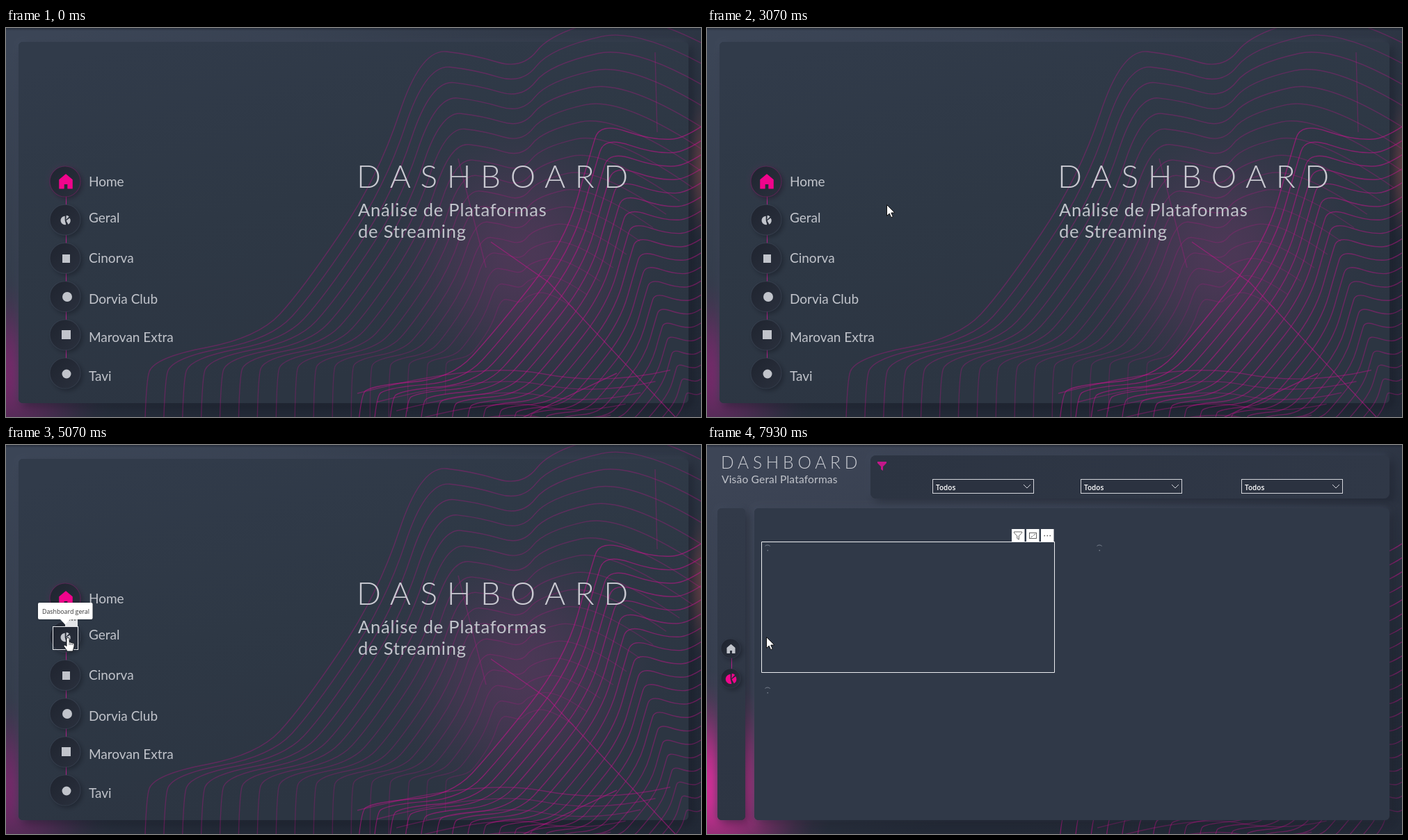
These frames come from a looping animation (999x560 px, 8 s). An HTML page with a canvas:

```html
<!DOCTYPE html>
<html lang="pt">
<head>
<meta charset="utf-8">
<title>Dashboard</title>
<style>
html, body { margin: 0; width: 100%; height: 100%; overflow: hidden; background: #2f3947; }
canvas { display: block; width: 999px; height: 560px; }
</style>
</head>
<body>
<canvas id="stage" width="999" height="560"></canvas>
<script>
const W = 999, H = 560, LOOP = 8000, TICK = 200 / 3;
const PINK = '#f0058c', GREY = '#c1c4cb', CLEAR = 'rgba(32,39,52,0)';
const SANS = 'Lato, "Open Sans", sans-serif';
const UI = '"Open Sans", "Noto Sans", sans-serif';
const stage = document.getElementById('stage').getContext('2d');

function layer(draw) {
  const c = document.createElement('canvas');
  c.width = W;
  c.height = H;
  draw(c.getContext('2d'));
  return c;
}

function text(g, str, x, y, font, color, spacing = 0) {
  g.font = font;
  g.letterSpacing = spacing + 'px';
  g.fillStyle = color;
  g.fillText(str, x, y);
}

function shape(g, pts, x = 0, y = 0, s = 1) {
  g.beginPath();
  pts.forEach(([a, b]) => g.lineTo(x + a * s, y + b * s));
  g.closePath();
}

function line(g, ...pts) {
  g.beginPath();
  pts.forEach(p => g.lineTo(...p));
  g.stroke();
}

function linear(g, x0, y0, x1, y1, ...colors) {
  const grad = g.createLinearGradient(x0, y0, x1, y1);
  colors.forEach((c, i) => grad.addColorStop(i / (colors.length - 1), c));
  return grad;
}

function glow(g, x, y, rx, ry, rgb, alpha) {
  g.save();
  g.translate(x, y);
  g.scale(rx, ry);
  const grad = g.createRadialGradient(0, 0, 0, 0, 0, 1);
  for (let r = 0; r <= 1; r += .125) {
    grad.addColorStop(r, `rgba(${rgb},${alpha * (1 + Math.cos(r * Math.PI)) / 2})`);
  }
  g.fillStyle = grad;
  g.fillRect(-1, -1, 2, 2);
  g.restore();
}

function panel(g, x, y, w, h, r, fill, dark = .4) {
  g.save();
  g.beginPath();
  g.roundRect(x, y, w, h, r);
  g.fillStyle = fill;
  g.shadowColor = 'rgba(70,80,100,.5)';
  g.shadowBlur = 8;
  g.shadowOffsetX = g.shadowOffsetY = -2;
  g.fill();
  g.shadowColor = `rgba(15,18,28,${dark})`;
  g.shadowBlur = 14;
  g.shadowOffsetX = g.shadowOffsetY = 5;
  g.fill();
  g.restore();
}

function backdrop(g, top, middle) {
  g.fillStyle = linear(g, 100, 0, 300, H, top, middle, '#222936');
  g.fillRect(0, 0, W, H);
  g.fillStyle = linear(g, 400, 0, W, 0, CLEAR, 'rgba(32,39,52,.35)');
  g.fillRect(0, 0, W, H);
}

function topEdge(g, rgb, alpha) {
  g.fillStyle = linear(g, 0, 0, 0, 4, `rgba(${rgb},${alpha})`, `rgba(${rgb},0)`);
  g.fillRect(0, 0, W, 4);
}

// ---- contour lines ----

function curve(g, pts) {
  g.beginPath();
  g.moveTo(...pts[0]);
  for (let i = 1; i < pts.length - 1; i++) {
    const [x, y] = pts[i], [nx, ny] = pts[i + 1];
    g.quadraticCurveTo(x, y, (x + nx) / 2, (y + ny) / 2);
  }
  g.stroke();
}

// each line is the ridge shrunk a step further towards one point
function contours(g, ridge, cx, cy, n, step, alpha) {
  g.lineWidth = 1.4;
  for (let k = 0; k < n; k++) {
    const s = 1 - k * step;
    g.strokeStyle = `rgba(203,18,143,${alpha * (.5 + s / 2)})`;
    curve(g, ridge.map(([x, y]) => [cx + (x - cx) * s, cy + (y - cy) * s]));
  }
}

const hill = [
  [198, 720], [198, 515], [214, 474], [362, 446], [425, 378], [535, 215],
  [596, 30], [670, 38], [742, 60], [785, 5], [940, -30], [1300, 220]
];
const slope = [
  [500, 720], [504, 530], [530, 514], [640, 505], [700, 440], [803, 310],
  [840, 180], [854, 136], [930, 162], [985, 158], [1100, 60]
];

function hills(g) {
  contours(g, hill, 740, 480, 17, .05, .33);
}

function slopes(g) {
  contours(g, slope, 1000, 590, 20, .045, .56);
  contours(g, [[505, 526], [680, 480], [860, 515], [1050, 470]], 760, 640, 5, .11, .4);
}

function rays(g) {
  g.strokeStyle = 'rgba(203,18,143,.5)';
  line(g, [697, 308], [780, 366], [962, 560]);
  line(g, [878, 497], [740, 562]);
  g.strokeStyle = 'rgba(203,18,143,.28)';
  line(g, [650, 188], [690, 345]);
  line(g, [933, 35], [936, 150]);
}

// ---- icons ----

function house(g, x, y, s, color) {
  g.fillStyle = g.strokeStyle = color;
  g.lineJoin = 'round';
  g.lineWidth = s * .16;
  shape(g, [[0, -.95], [.85, -.22], [.85, .92], [.3, .92], [.3, .3], [-.3, .3],
    [-.3, .92], [-.85, .92], [-.85, -.22]], x, y, s);
  g.fill();
  g.stroke();
}

function pie(g, x, y, r, color) {
  g.fillStyle = color;
  const slice = (dx, dy, a, b) => {
    g.beginPath();
    g.moveTo(x + dx, y + dy);
    g.arc(x + dx, y + dy, r, a * Math.PI, b * Math.PI);
    g.fill();
  };
  slice(-.8, 0, .42, 1.5);
  slice(.8, -1, 1.52, 1.75);
  slice(1, .2, -.2, .34);
}

function funnel(g, x, y, s) {
  shape(g, [[0, 0], [13, 0], [13, 2], [8, 7], [8, 13], [5, 11], [5, 7], [0, 2]], x, y, s);
}

function dot(g, x, y, r) {
  g.beginPath();
  g.arc(x, y, r, 0, 7);
  g.fill();
}

function disc(g, x, y, r, rim) {
  g.save();
  g.fillStyle = linear(g, x - r, y - r, x + r, y + r, '#1f242f', '#2a303d');
  g.shadowColor = 'rgba(14,17,26,.45)';
  g.shadowBlur = 7;
  g.shadowOffsetX = g.shadowOffsetY = 3;
  dot(g, x, y, r);
  g.restore();
  g.strokeStyle = rim;
  g.lineWidth = 1.2;
  g.stroke();
}

function link(g, x, y0, y1) {
  g.fillStyle = '#b3208a';
  g.fillRect(x, y0, 1, y1 - y0);
}

// ---- pages ----

const menu = [
  ['Home', 228], ['Geral', 280], ['Cinorva', 338],
  ['Dorvia Club', 397], ['Marovan Extra', 452], ['Tavi', 508]
];
const menuY = i => 221 + 55.2 * i;

const homePage = layer(g => {
  backdrop(g, '#3b4556', '#343d4c');
  glow(g, 0, 500, 160, 150, '150,38,125', .65);
  panel(g, 18, 20, 963, 520, 6, linear(g, 200, 20, 320, 540, '#313b4a', '#2e3845', '#2c3542'), .45);
  glow(g, 1005, 200, 32, 120, '150,75,75', .5);
  glow(g, 740, 330, 210, 220, '118,58,112', .42);
  hills(g);
  slopes(g);
  rays(g);

  link(g, 86, menuY(0), menuY(5));
  glow(g, 85, 221, 32, 32, '160,30,125', .3);
  menu.forEach(([name, base], i) => {
    disc(g, 85, menuY(i), 22, i ? 'rgba(70,80,98,.4)' : 'rgba(150,30,115,.4)');
    text(g, name, 119, base, '19px ' + SANS, GREY);
  });
  house(g, 86, 221, 10.5, PINK);
  pie(g, 85.5, 277, 6.2, GREY);
  g.fillStyle = GREY;
  g.fillRect(81, 326, 11, 12);
  dot(g, 88, 387, 7);
  g.fillRect(80, 435, 13, 13);
  dot(g, 87, 498, 6.5);

  text(g, 'DASHBOARD', 504, 230, '300 46px ' + SANS, '#cacad2', 13.6);
  text(g, 'Análise de Plataformas', 506, 271, '25.5px ' + SANS, GREY, .8);
  text(g, 'de Streaming', 506, 302, '25.5px ' + SANS, GREY, .8);
  topEdge(g, '20,25,36', .5);
});

const blankPage = layer(g => {
  g.fillStyle = '#fefefe';
  g.fillRect(0, 0, W, H);
  topEdge(g, '110,110,110', .4);
});

const overviewPage = layer(g => {
  backdrop(g, '#3d4556', '#353d4d');
  glow(g, 0, 495, 185, 170, '212,46,152', .95);
  slopes(g);
  panel(g, 235, 15, 746, 62, 8, linear(g, 235, 0, 981, 0, '#2c3442', '#303847'));
  panel(g, 15, 91, 40, 449, 6, linear(g, 0, 91, 0, 540, '#323a49', '#2d3543'));
  panel(g, 68, 91, 913, 449, 6, '#303948', .3);

  text(g, 'DASHBOARD', 20, 34, '300 24.5px ' + SANS, '#cdcfd5', 5.8);
  text(g, 'Visão Geral Plataformas', 21, 55, '15.5px ' + SANS, GREY, .2);
  g.fillStyle = '#c4178a';
  funnel(g, 245, 24, 1);
  g.fill();

  link(g, 35, 293, 336);
  disc(g, 34, 293, 14, 'rgba(70,80,98,.3)');
  disc(g, 34, 336, 14, 'rgba(70,80,98,.3)');
  house(g, 34.5, 293.5, 6.5, GREY);
  pie(g, 34.5, 337, 7, PINK);
  g.strokeStyle = '#eceef1';
  g.lineWidth = 1;
  g.strokeRect(78.5, 139.5, 421, 188);
  topEdge(g, '20,25,36', .5);
});

// ---- changing parts ----

function spinner(g, x, y, turn) {
  g.strokeStyle = g.fillStyle = 'rgba(175,182,195,.55)';
  g.lineWidth = 1;
  g.beginPath();
  g.arc(x, y + 2, 5, turn - 2.4, turn - .75);
  g.stroke();
  g.fillRect(x - .5, y + 4, 1.5, 1.5);
}

function dropdown(g, x) {
  g.fillStyle = '#2b3240';
  g.fillRect(x, 49, 145, 21);
  g.strokeStyle = '#d4d6dc';
  g.lineWidth = 1;
  g.strokeRect(x + .5, 49.5, 145, 20);
  text(g, 'Todos', x + 5, 64.5, '600 10px ' + UI, '#fff');
  line(g, [x + 131, 57], [x + 136, 62], [x + 141, 57]);
}

function dots(g, x, y) {
  g.fillStyle = '#555';
  for (let i = -1; i < 2; i++) g.fillRect(x + i * 4 - .7, y - .7, 1.5, 1.5);
}

function tools(g) {
  g.fillStyle = '#fff';
  for (let i = 0; i < 3; i++) g.fillRect(438 + 21 * i, 121, 18.5, 18);
  g.strokeStyle = '#555';
  g.lineWidth = .9;
  funnel(g, 441.5, 125, .85);
  g.stroke();
  g.strokeRect(463.5, 126.5, 10, 8);
  line(g, [469, 130.5], [472, 128]);
  line(g, [465.5, 133], [468, 131]);
  dots(g, 489.2, 130.5);
}

function tooltip(g) {
  g.save();
  g.shadowColor = 'rgba(0,0,0,.35)';
  g.shadowBlur = 3;
  g.fillStyle = '#fff';
  g.beginPath();
  g.roundRect(46, 227, 78.5, 24, 2);
  g.fill();
  g.restore();
  g.fillStyle = '#fff';
  shape(g, [[78, 251], [92, 251], [85, 258.5]]);
  g.fill();
  text(g, 'Dashboard geral', 52, 243, '8.8px ' + UI, '#333');
}

function arrow(g, x, y) {
  shape(g, [[0, 0], [0, 16], [3.7, 12.6], [6.2, 18.2], [8.8, 17], [6.3, 11.6], [11.3, 11.4]],
    x + .5, y + .5);
  g.fillStyle = '#fff';
  g.strokeStyle = '#111';
  g.lineWidth = 1;
  g.lineJoin = 'miter';
  g.fill();
  g.stroke();
}

function hand(g, x, y) {
  g.save();
  g.translate(x, y);
  g.beginPath();
  g.moveTo(-2, 1.5);
  g.quadraticCurveTo(0, -1.2, 2, 1.5);
  g.lineTo(2, 6.5);
  g.lineTo(8, 8.2);
  g.quadraticCurveTo(9.6, 9, 9, 13);
  g.lineTo(7, 20);
  g.lineTo(-1, 20);
  g.lineTo(-6, 12.5);
  g.quadraticCurveTo(-5.5, 9.6, -2, 12.5);
  g.closePath();
  g.fillStyle = '#fff';
  g.strokeStyle = '#15181f';
  g.lineWidth = 1;
  g.fill();
  g.stroke();
  g.lineWidth = .7;
  for (let i = 0; i < 3; i++) line(g, [2 + 2.3 * i, 7 + .6 * i], [2 + 2.3 * i, 11]);
  g.restore();
}

// pointer moves: start and end time, then where the tip arrives
const moves = [
  [1133, 1533, 6, 507], [1600, 2200, 287, 368], [2200, 2467, 300, 251], [2467, 2733, 286, 243],
  [2867, 3133, 249, 257], [3200, 3933, 102, 284], [3933, 4067, 93, 281], [4133, 4533, 89, 277]
];

function pointer(t) {
  let x = 2, y = 555;
  for (const [from, to, nx, ny] of moves) {
    const u = Math.min(1, Math.max(0, (t - from) / (to - from)));
    x += (nx - x) * u;
    y += (ny - y) * u;
  }
  return [Math.round(x), Math.round(y)];
}

function home(g, t) {
  g.drawImage(homePage, 0, 0);
  if (t >= 4190) {
    g.fillStyle = '#e4e5e8';
    g.fillRect(85, 243, 18, 18);
    dots(g, 95, 252);
  }
  if (t >= 3990) {
    g.strokeStyle = '#e6e8eb';
    g.lineWidth = 1;
    g.strokeRect(67.5, 261.5, 36, 33);
  }
  if (t >= 4790) tooltip(g);
  if (t < 1195) return;
  const [x, y] = pointer(t);
  (x < 105 && t > 3200 ? hand : arrow)(g, x, y);
}

function overview(g, t) {
  g.drawImage(overviewPage, 0, 0);
  const turn = -.8 + (t - 7200) / 730 * (Math.PI * 2 + .8);
  [[87, 147], [564, 147], [87, 352]].forEach(([x, y]) => spinner(g, x, y, turn));
  if (t >= 7390) tools(g);
  if (t >= 7590) [324, 537, 768].forEach(x => dropdown(g, x));
  arrow(g, 85, 276);
}

function frame(now) {
  // the picture advances fifteen times a second
  const t = Math.floor((now % LOOP + 5) / TICK) * TICK;
  if (t < 6725) home(stage, t);
  else if (t < 7195) {
    stage.drawImage(blankPage, 0, 0);
    arrow(stage, 85, 276);
  } else overview(stage, t);
  requestAnimationFrame(frame);
}
requestAnimationFrame(frame);
</script>
</body>
</html>
```
